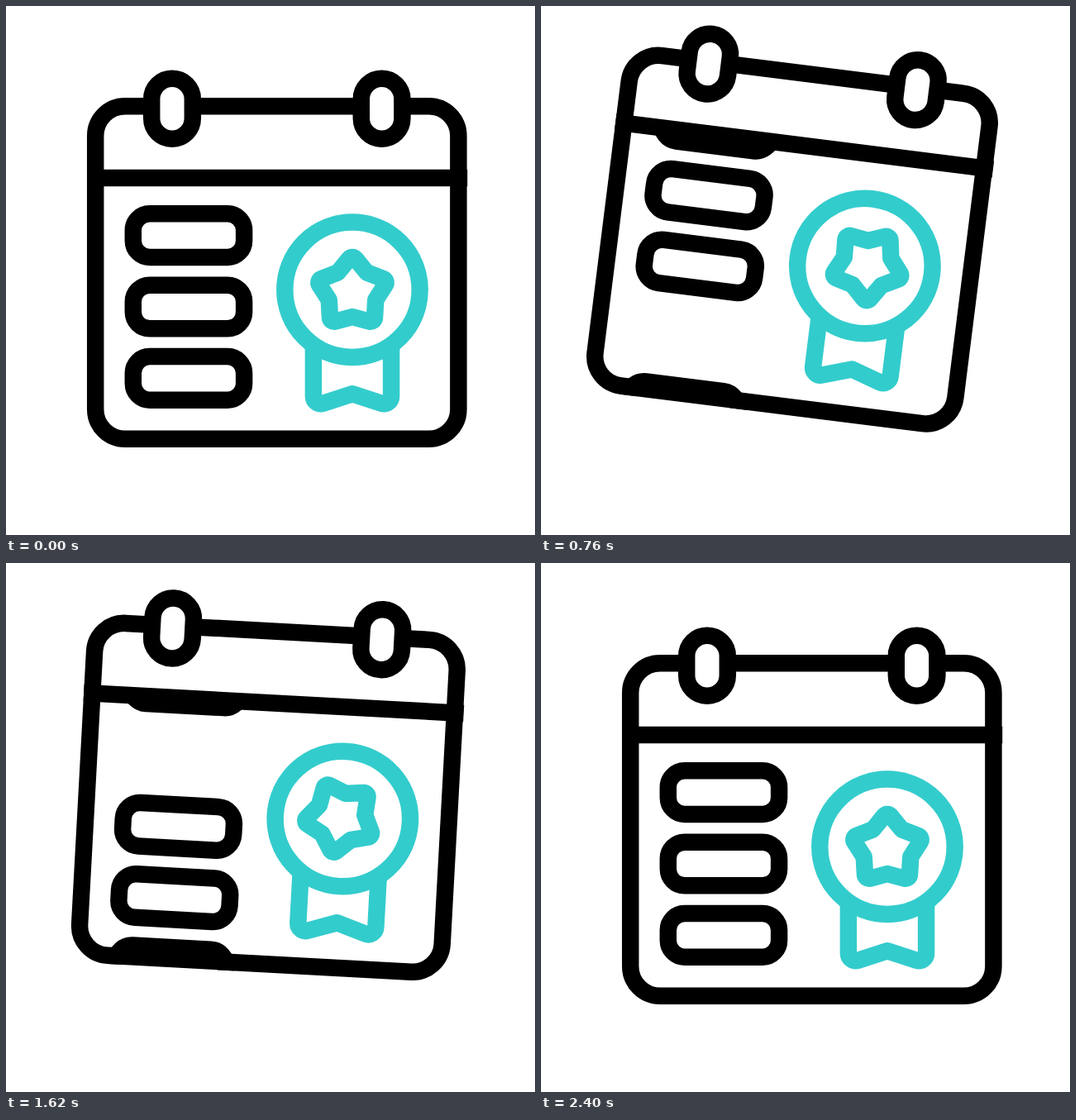
An HTML page for the animation above (2.42 s loop, 640 px wide and 640 px high).

```html
<!DOCTYPE html>
<html lang="en">
<head>
<meta charset="utf-8">
<title>Award calendar</title>
<style>
  html, body { margin: 0; width: 100%; height: 100%; overflow: hidden; background: #fff; }
  svg { display: block; width: 100vw; height: 100vh; }
</style>
</head>
<body>
<svg viewBox="0 0 640 640" fill="none" stroke="#000" stroke-width="20.48">
  <defs>
    <clipPath id="page"><rect x="98" y="208" width="460" height="326"/></clipPath>
  </defs>
  <g id="calendar">
    <g clip-path="url(#page)"><g id="bars"></g></g>
    <rect x="108.2" y="121.3" width="439.2" height="402.5" rx="35.8"/>
    <path d="M98 208H558.2"/>
    <g id="rings" fill="#fff"></g>
    <g stroke="#33cccc" stroke-linejoin="round">
      <path id="ribbon"/>
      <circle cx="419" cy="343.3" r="81.7"/>
      <path id="star"/>
    </g>
  </g>
</svg>
<script>
const LOOP = 2420, STEP = 20, SPAN = 2400;
const PIVOT = [328, 131], MEDAL = [419, 343.3];
const LIFT = 38.4, ROW = 86.4;
const $ = id => document.getElementById(id);

function addRect(parent, x, y, width, height, rx) {
  const el = document.createElementNS('http://www.w3.org/2000/svg', 'rect');
  Object.entries({ x, y, width, height, rx }).forEach(([k, v]) => el.setAttribute(k, v));
  parent.append(el);
}

// Path through [x, y, radius] points, each corner rounded by its radius.
function roundedPath(points, closed) {
  const n = points.length;
  let d = '';
  points.forEach(([x, y, r = 0], i) => {
    const cmd = i ? 'L' : 'M';
    if (!r) {
      d += `${cmd}${x} ${y}`;
      return;
    }
    const [ax, ay] = points[(i + n - 1) % n], [bx, by] = points[(i + 1) % n];
    const la = Math.hypot(ax - x, ay - y), lb = Math.hypot(bx - x, by - y);
    const ux = (ax - x) / la, uy = (ay - y) / la;
    const vx = (bx - x) / lb, vy = (by - y) / lb;
    const cut = r / Math.tan(Math.acos(ux * vx + uy * vy) / 2);
    const sweep = ux * vy - uy * vx < 0 ? 1 : 0;
    d += `${cmd}${x + ux * cut} ${y + uy * cut}`
       + `A${r} ${r} 0 0 ${sweep} ${x + vx * cut} ${y + vy * cut}`;
  });
  return d + (closed ? 'Z' : '');
}

for (const x of [201, 454.6]) addRect($('rings'), x - 24.8, 87.8, 49.6, 72.9, 24.8);

// Two sets of three rows with one empty row between them.
for (const row of [0, 1, 2, 4, 5, 6]) addRect($('bars'), 153.8, 251.3 + row * ROW, 134.3, 52.6, 20);

$('ribbon').setAttribute('d', roundedPath([
  [371.9, 410], [371.9, 484.6, 9], [419, 469.2], [466.1, 484.6, 9], [466.1, 410]
]));

$('star').setAttribute('d', roundedPath(Array.from({ length: 10 }, (_, i) => {
  const a = i * Math.PI / 5, r = i % 2 ? 29.7 : 45.4;
  return [MEDAL[0] + r * Math.sin(a), MEDAL[1] + 3.1 - r * Math.cos(a), i % 2 ? 0 : 5];
}), true));

const ease = u => u * u * (3 - 2 * u);

// Eased value through evenly spaced keys, u from 0 to 1.
function track(keys, u) {
  const p = u * (keys.length - 1), i = Math.min(Math.floor(p), keys.length - 2);
  return keys[i] + (keys[i + 1] - keys[i]) * ease(p - i);
}

function draw(ms) {
  const t = Math.floor((ms % LOOP) / STEP) * STEP;
  const u = Math.min(t / SPAN, 1);
  const tilt = track([0, 11, -11, 7, 0], u);
  const lift = track([0, 1, 1, 1, 0], u) * LIFT;
  $('calendar').setAttribute('transform', `translate(0 ${-lift}) rotate(${tilt} ${PIVOT})`);
  $('bars').setAttribute('transform', `translate(0 ${-4 * ROW * ease(u)})`);
  $('star').setAttribute('transform', `rotate(${-360 * u} ${MEDAL})`);
}

const start = performance.now();
function tick() {
  draw(performance.now() - start);
  requestAnimationFrame(tick);
}
tick();
</script>
</body>
</html>
```
